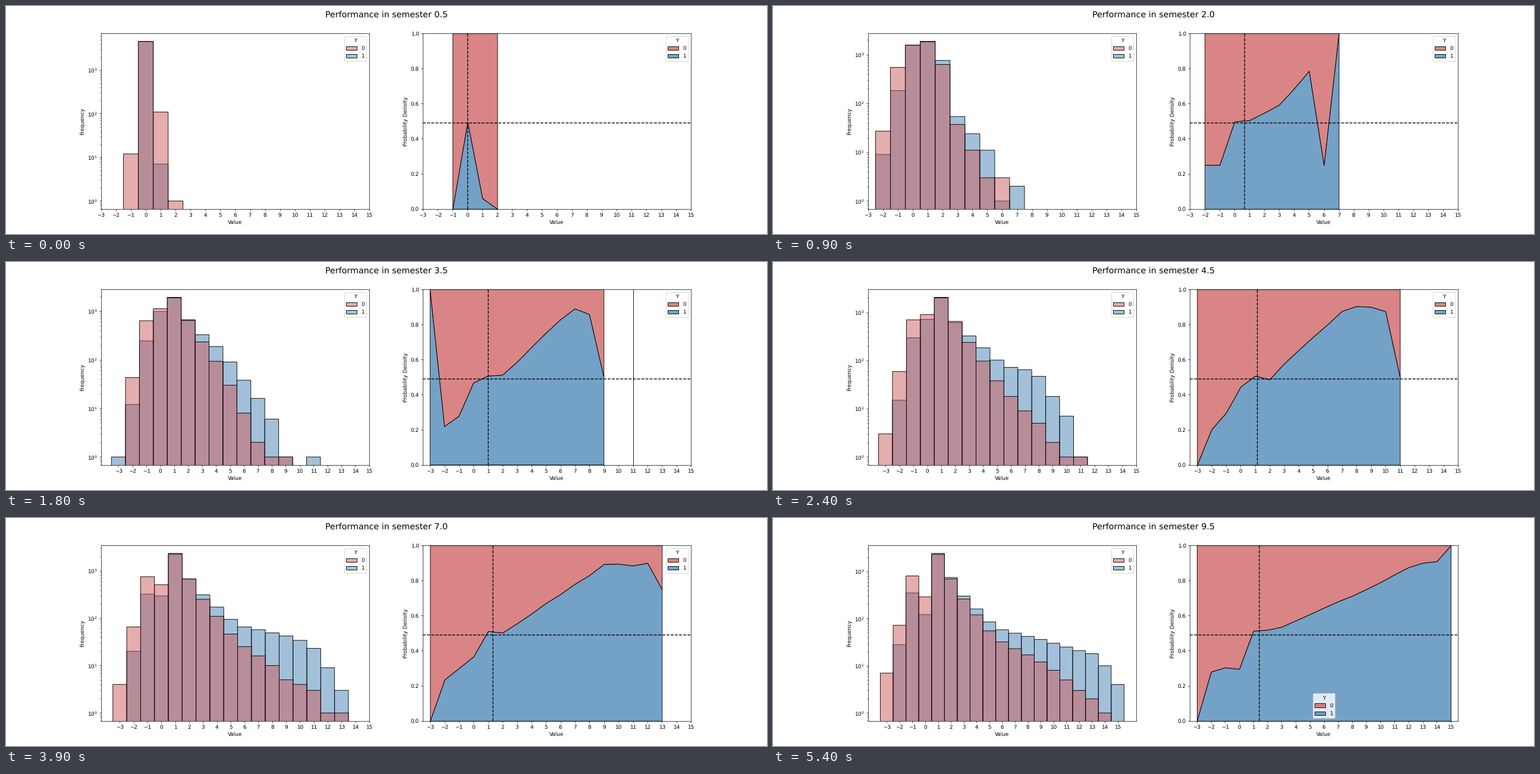
Animation, 1280 px wide and 384 px high, one loop 5.7 s. Source, as a matplotlib script:

```python
import matplotlib.pyplot as plt
import numpy as np
from matplotlib.animation import FuncAnimation
from matplotlib.colors import to_rgba
from matplotlib.patches import Patch

plt.rcParams["text.hinting"] = "none"

BINS = np.arange(-3, 16)
SIZES = (4680, 4490)
COLORS = ("indianred", "steelblue")

# Core values: counts of each group at the key semesters, eased on a log scale
KEY_TIMES = (0.5, 2, 4.5, 9.5)
CORE = {
    -3: ((0, 0, 3, 7), (0, 0, 0, 0)),
    -2: ((0, 27, 59, 72), (0, 9, 15, 28)),
    -1: ((12, 550, 697, 800), (0, 184, 295, 350)),
    0: ((4558, 1575, 892, 288), (4483, 1562, 715, 121)),
    2: ((1, 630, 646, 690), (0, 762, 612, 743)),
}

# Lone results off the trend: (semester, value) -> counts
STRAYS = {(2.0, 6): (3, 1), (3.5, -3): (0, 1), (3.5, 11): (0, 1)}


def core(keys, t):
    log_count = np.interp(t, KEY_TIMES, np.log1p(keys))
    return np.floor(np.expm1(log_count) + 1e-6)


def front(t):
    """Highest value reached by semester t."""
    return int(np.interp(t, (0.5, 1, 1.5, 2.5, 3.5, 4, 5.5, 9.5),
                         (2, 5, 5, 9, 9, 11, 11.8, 15.02)))


def tail(v, t):
    """Counts of both groups at a value above 2."""
    settled = np.exp(np.interp(v, (3, 5, 6, 13), np.log((560, 140, 90, 20))))
    total = min(settled, 1.4 * np.sqrt(t) * 2.6 ** (front(t) - v))
    share = min(0.5 + (0.112 - 0.008 * t) * (v - 2), 0.9)
    if v == front(t):
        share = np.interp(t, (2, 3.5, 4.5, 7, 8.5), (1, 0.5, 0.5, 0.8, 1))
    return np.rint((total * (1 - share), total * share))


def counts_at(t):
    counts = np.zeros((2, len(BINS)))
    for v, keys in CORE.items():
        counts[:, v + 3] = [core(k, t) for k in keys]
    for v in range(3, front(t) + 1):
        counts[:, v + 3] = tail(v, t)
    for (when, v), pair in STRAYS.items():
        if when == t:
            counts[:, v + 3] = pair
    counts[:, 4] = SIZES - counts.sum(axis=1)   # everyone else sits at 1
    return counts


def add_legend(ax, alpha, loc):
    keys = [Patch(facecolor=to_rgba(c, alpha), edgecolor="black", linewidth=1)
            for c in COLORS]
    ax.legend(keys, ["0", "1"], title="Y", loc=loc)


def draw_hist(ax, groups, lo, hi):
    ax.set_yscale("log")
    for counts, color in reversed(list(zip(groups, COLORS))):
        seen = counts > 0
        ax.bar(BINS[seen], counts[seen], width=1, linewidth=1, snap=False,
               facecolor=to_rgba(color, 0.5), edgecolor="black")
    pad = 0.05 * (hi - lo)
    ax.set_xlim(min(lo - pad, -3), max(hi + pad, 15))
    top = np.log10(np.max(groups))
    ax.set_ylim(10 ** (-0.05 * top), 10 ** (1.05 * top))
    ax.set_ylabel("Frequency")
    add_legend(ax, 0.5, "upper right")


def draw_share(ax, groups, lo, hi):
    total = groups.sum(axis=0)
    share = np.full(len(BINS), np.nan)
    np.divide(groups[1], total, out=share, where=total > 0)
    for color, bottom, top in (("steelblue", 0 * share, share),
                               ("indianred", share, 0 * share + 1)):
        ax.fill_between(BINS, bottom, top, linewidth=1,
                        facecolor=to_rgba(color, 0.75), edgecolor="black")
    dashes = dict(color="black", linestyle="--", snap=False)
    ax.axhline(SIZES[1] / sum(SIZES), **dashes)
    ax.axvline((BINS * total).sum() / total.sum(), **dashes)
    ax.set_xlim(min(lo, -3), max(hi, 15))
    ax.set_ylim(0, 1)
    ax.set_ylabel("Probability Density")
    add_legend(ax, 0.75, "lower center" if hi > 14 else "upper right")


fig, (left, right) = plt.subplots(1, 2, figsize=(20, 6), dpi=64)
title = fig.suptitle("", fontsize=16)


def update(i):
    semester = (i + 1) / 2
    groups = counts_at(semester)
    seen = BINS[groups.sum(axis=0) > 0]
    lo, hi = seen[0] - 0.5, seen[-1] + 0.5
    title.set_text(f"Performance in semester {semester:.1f}")
    for ax, draw in ((left, draw_hist), (right, draw_share)):
        ax.clear()
        draw(ax, groups, lo, hi)
        ax.set_xticks(BINS)
        ax.set_xlabel("Value")
    return []


anim = FuncAnimation(fig, update, frames=19, interval=300, init_func=lambda: [],
                     repeat=True, repeat_delay=0, blit=False)
plt.show()
```
